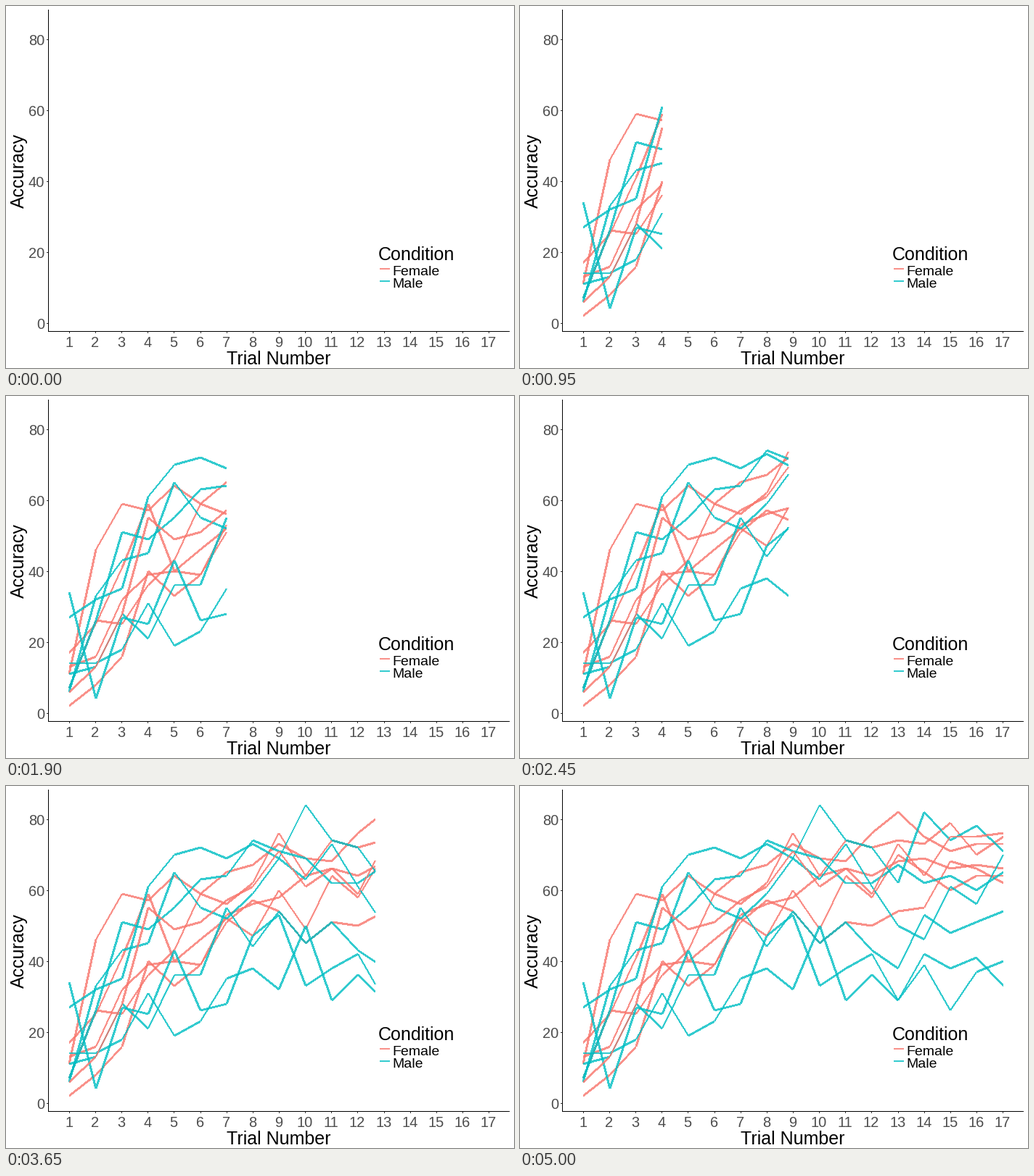
A matplotlib script that plays this animation: 700 by 500 pixels, repeating every 5.05 s.

```python
import matplotlib.pyplot as plt
import numpy as np
from matplotlib.animation import FuncAnimation
from matplotlib.patches import PathPatch, Rectangle
from matplotlib.path import Path

W, H, DPI = 700, 500, 100
TRIALS, FRAMES, STEP_MS = 17, 101, 50
PINK, TEAL = "#F8766D", "#00BFC4"
ALPHA = 0.8

# accuracy per trial, one row per participant
FEMALE = [
    [11, 46, 59, 57, 64, 59, 56, 62, 76, 64, 74, 72, 74, 73, 79, 70, 75],
    [17, 25, 41, 59, 40, 46, 52, 47, 60, 49, 64, 58, 70, 65, 60, 64, 64],
    [13, 16, 32, 39, 40, 39, 51, 57, 54, 45, 51, 50, 54, 55, 68, 66, 62],
    [7, 26, 25, 36, 43, 59, 65, 67, 73, 69, 68, 76, 82, 75, 71, 73, 73],
    [2, 8, 16, 40, 33, 39, 53, 56, 58, 64, 66, 64, 68, 69, 66, 67, 66],
    [6, 13, 28, 55, 49, 51, 57, 61, 71, 61, 66, 59, 73, 64, 75, 75, 76],
]
MALE = [
    [7, 26, 51, 49, 55, 63, 64, 74, 71, 69, 62, 62, 67, 62, 64, 60, 65],
    [6, 33, 43, 45, 65, 55, 52, 59, 69, 84, 74, 72, 62, 82, 74, 78, 71],
    [27, 32, 35, 61, 70, 72, 69, 73, 69, 63, 73, 61, 50, 46, 61, 56, 70],
    [34, 4, 27, 25, 43, 26, 28, 47, 53, 33, 38, 42, 29, 42, 38, 41, 33],
    [11, 13, 28, 21, 36, 36, 55, 44, 54, 45, 51, 43, 38, 53, 48, 51, 54],
    [14, 14, 18, 31, 19, 23, 35, 38, 32, 50, 29, 36, 29, 39, 26, 37, 40],
]

plt.rcParams["font.family"] = "Liberation Sans"
fig = plt.figure(figsize=(W / DPI, H / DPI), dpi=DPI, facecolor="white")
ax = fig.add_axes([0, 0, 1, 1])
ax.set_xlim(0, W)
ax.set_ylim(H, 0)
ax.axis("off")


def px(trial):
    return 87.4 + 36.136 * (trial - 1)


def py(value):
    return 438.0 - 4.905 * value


def bar(x, y, w, h, color, alpha=1):
    ax.add_patch(Rectangle((x, y), w, h, fc=color, alpha=alpha, lw=0,
                           antialiased=False))


def label(x, y, text, size, color="black", ha="center", **kw):
    ax.text(x, y, text, fontsize=size * 72 / DPI, color=color, ha=ha,
            va="baseline", **kw)


def segment(x0, y0, x1, y1):
    """Quad for one stroke; mid-steep strokes come out one pixel wide."""
    slope = abs((y1 - y0) / (x1 - x0))
    if slope < 1.2:
        return [(x0, y0 - 1), (x1, y1 - 1), (x1, y1 + 1), (x0, y0 + 1)]
    w = 0.5 if slope < 2.25 else 1
    if y1 < y0:
        x0, y0, x1, y1 = x1, y1, x0, y0
    return [(x0 - w, y0), (x0 + w, y0), (x1 + w, y1), (x1 - w, y1)]


QUAD = [Path.MOVETO] + [Path.LINETO] * 3 + [Path.CLOSEPOLY]
EMPTY = Path(np.zeros((0, 2)))


def ribbon(xs, ys):
    verts, codes = [], []
    for x0, y0, x1, y1 in zip(xs, ys, xs[1:], ys[1:]):
        if x1 > x0:
            quad = segment(x0, y0, x1, y1)
            verts += quad + quad[:1]
            codes += QUAD
    return Path(verts, codes) if verts else EMPTY


# axes
bar(58, 5, 1, 445, "black")
bar(58, 449, 636, 1, "black")
for v in range(0, 81, 20):
    y = round(py(v))
    bar(56, y, 2, 1, "#333333")
    label(53, y + 8, str(v), 20, "#4D4D4D", "right")
for t in range(1, TRIALS + 1):
    x = int(px(t))
    bar(x, 450, 1, 2, "#333333")
    label(x, 471, str(t), 20, "#4D4D4D")
label(375.5, 495, "Trial Number", 25)
label(25, 227.5, "Accuracy", 25, rotation=90, rotation_mode="anchor")

# legend
label(512.5, 351, "Condition", 25, ha="left")
for y, name, color in ((362, "Female", PINK), (379, "Male", TEAL)):
    bar(515, y, 14, 2, color, ALPHA)
    label(532.5, y + 10, name, 19.5, ha="left")

rows = ([(r, PINK) for r in FEMALE[:-1]] + [(r, TEAL) for r in MALE]
        + [(FEMALE[-1], PINK)])
curves = []
for row, color in rows:
    patch = PathPatch(EMPTY, fc=color, alpha=ALPHA, lw=0, antialiased=False,
                      snap=False)
    ax.add_patch(patch)
    curves.append((patch, np.array(row, float)))

trials = np.arange(1, TRIALS + 1)
# each trial is reached on a whole frame
reach = [round((FRAMES - 1) * (t - 1) / (TRIALS - 1)) for t in trials]


def draw(i):
    now = np.interp(i, reach, trials)
    seen = np.append(trials[trials < now], now)
    xs = np.round(px(seen))
    for patch, row in curves:
        ys = np.round(py(np.interp(seen, trials, row)))
        patch.set_path(ribbon(xs, ys))
    return [patch for patch, _ in curves]


anim = FuncAnimation(fig, draw, frames=FRAMES, interval=STEP_MS, repeat=True,
                     repeat_delay=0, blit=False)
plt.show()
```
